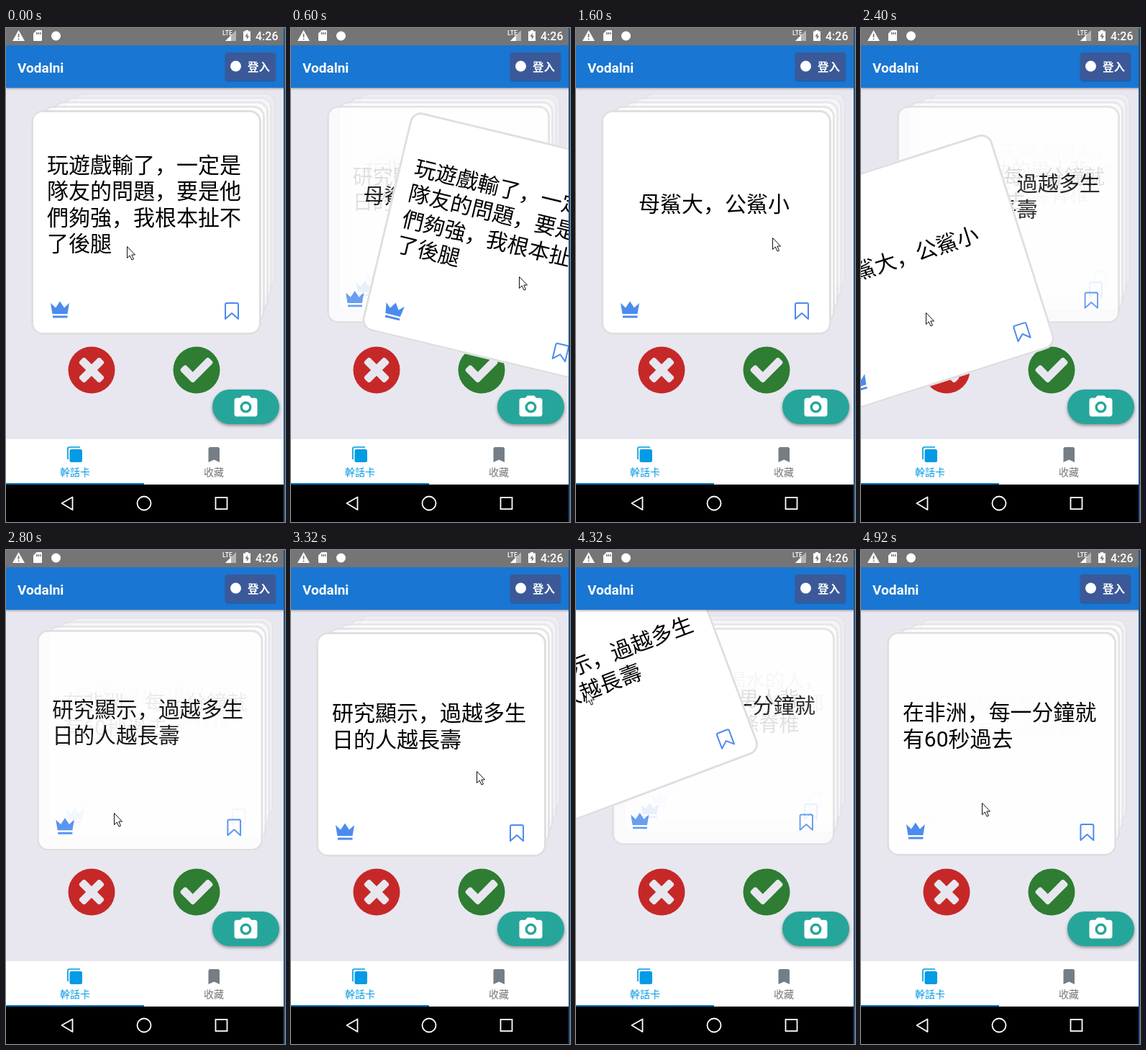
Recreate the animation shown at these times as an HTML page. Size 388 by 686 pixels, loop 4.96 s.

```html
<!DOCTYPE html>
<html lang="zh-Hans">
<head>
<meta charset="utf-8">
<title>Cards</title>
<style>
html, body { margin: 0; width: 100%; height: 100%; overflow: hidden; }
body { background: #e8e7f0; font-family: Roboto, "Noto Sans CJK SC", "Noto Sans CJK", sans-serif; }
#stage { position: relative; width: 388px; height: 686px; overflow: hidden; background: #e8e7f0; }
svg { position: absolute; left: 0; top: 0; overflow: visible; }
#deck { position: absolute; z-index: 0; left: 0; top: 83px; width: 388px; height: 488px; overflow: hidden; }
#bar, #fab, #front { z-index: 1; }
.card {
  position: absolute; left: 35px; top: 31px; width: 320px; height: 312px;
  background: #fff; border-radius: 16px; box-shadow: inset 0 0 0 3px #dfdfe1;
}
.words {
  position: absolute; left: 22px; top: 0; width: 270px; height: 263px;
  display: flex; align-items: center; justify-content: center;
  font-size: 30px; line-height: 36.2px; color: #000; white-space: pre;
}
.words.long { justify-content: flex-start; }
#bar { position: absolute; left: 0; top: 24px; width: 388px; height: 59px; background: #1976d2; box-shadow: 0 1px 3px rgba(0,0,0,.4); }
#login { position: absolute; left: 305px; top: 10px; width: 70px; height: 39px; border-radius: 4px; background: #3b5998; box-shadow: 0 1px 2px rgba(0,0,0,.25); }
#fab { position: absolute; left: 287px; top: 502px; width: 93px; height: 48px; border-radius: 24px; background: #26a69a; box-shadow: 0 2px 4px rgba(0,0,0,.4); }
</style>
</head>
<body>
<div id="stage">
  <svg width="388" height="686">
    <circle cx="119" cy="475" r="32.5" fill="#c62828"/>
    <circle cx="265" cy="475" r="32.5" fill="#2e7d32"/>
    <g fill="#e8e7f0">
      <path transform="translate(119 475) scale(.029) translate(-704 -960)" d="M1298 1322q0-40-28-68l-294-294 294-294q28-28 28-68t-28-68l-136-136q-28-28-68-28t-68 28l-294 294-294-294q-28-28-68-28t-68 28l-136 136q-28 28-28 68t28 68l294 294-294 294q-28 28-28 68t28 68l136 136q28 28 68 28t68-28l294-294 294 294q28 28 68 28t68-28l136-136q28-28 28-68z"/>
      <path transform="translate(265 475) scale(.029) translate(-896 -928)" d="M1671 566q0 40-28 68l-724 724-136 136q-28 28-68 28t-68-28l-136-136-362-362q-28-28-28-68t28-68l136-136q28-28 68-28t68 28l294 295 656-657q28-28 68-28t68 28l136 136q28 28 28 68z"/>
    </g>
  </svg>

  <div id="deck"></div>

  <div id="bar"><div id="login"></div></div>
  <div id="fab"></div>

  <svg id="front" width="388" height="686">
    <rect width="388" height="24" fill="#757575"/>
    <g fill="#fff">
      <path d="M17.5 3L26 18H9zM16.7 8v5h1.7V8zM16.7 14.5v1.8h1.7v-1.8z" fill-rule="evenodd"/>
      <path d="M42.5 3H49q1 0 1 1V17q0 1-1 1H39q-1 0-1-1V7.5zM42 6v3h1.5V6zM44.5 6v3H46V6zM47 6v3h1.5V6z" fill-rule="evenodd"/>
      <circle cx="69.5" cy="11" r="6.5"/>
      <text x="301" y="10" font-size="8.5" font-weight="500">LTE</text>
      <path d="M320 3V18H305z" opacity=".45"/>
      <path d="M313 10V18H305z"/>
      <path d="M333 3h4v1.5h3V18h-10V4.5h3zM335.8 7l-3.3 5h2.3v4l3.3-5h-2.3z" fill-rule="evenodd"/>
      <text x="347" y="17" font-size="16" font-weight="500">4:26</text>
      <text x="16" y="61.5" font-size="19" font-weight="700">Vodalni</text>
      <circle cx="319.5" cy="53" r="7.5"/>
      <text x="336" y="59.5" font-size="15.5" font-weight="700">登入</text>
      <path transform="translate(314.3 507.4) scale(1.6)" d="M9 2L7.17 4H4c-1.1 0-2 .9-2 2v12c0 1.1.9 2 2 2h16c1.1 0 2-.9 2-2V6c0-1.1-.9-2-2-2h-3.17L15 2zM12 17a5 5 0 1 1 0-10a5 5 0 1 1 0 10z" fill-rule="evenodd"/>
      <circle cx="333.5" cy="526.6" r="4.6"/>
    </g>

    <rect y="571" width="388" height="63" fill="#fff"/>
    <rect y="632" width="192" height="2" fill="#0277bd"/>
    <rect x="88.5" y="585" width="17.5" height="18" rx="2.5" fill="#039be5"/>
    <path d="M86 599V584q0-2 2-2H103" fill="none" stroke="#039be5" stroke-width="1.7"/>
    <path d="M281.5 603V584.5q0-2.5 2.5-2.5H294.5q2.5 0 2.5 2.5V603l-7.75-3.5z" fill="#757d86"/>
    <text x="75" y="622" font-size="14" fill="#039be5">幹話卡</text>
    <text x="275" y="622" font-size="14" fill="#757575">收藏</text>

    <rect y="634" width="388" height="52" fill="#000"/>
    <g fill="none" stroke="#fff" stroke-width="1.8">
      <path d="M77.5 660L92.5 651.5V669z" stroke-linejoin="round"/>
      <circle cx="192" cy="660" r="9.5"/>
      <rect x="291.5" y="652" width="16" height="16"/>
    </g>
    <rect x="386" width="2" height="686" fill="#24527f"/>
    <path id="cursor" d="M.5 .5V16.5L4.2 13L7 19L9.5 18L6.8 12H11.5z" fill="#fff" stroke="#111"/>
  </svg>
</div>

<script>
const LOOP = 4960;
const texts = [
  '玩遊戲輸了，一定是\n隊友的問題，要是他\n們夠強，我根本扯不\n了後腿',
  '母鯊大，公鯊小',
  '研究顯示，過越多生\n日的人越長壽',
  '在非洲，每一分鐘就\n有60秒過去',
  '每個成功的男人背\n後，都有一條脊椎',
  '凡是每天喝水的人，\n在一百年之後，全都\n會死掉',
  '', ''
];

// pointer path: time, x, y
const path = [
  [0, 168, 303], [200, 224, 312], [400, 262, 324], [600, 317, 345], [700, 345, 352],
  [1000, 335, 335], [1300, 300, 305], [1600, 273, 291], [1700, 212, 324], [1800, 196, 332],
  [2100, 145, 365], [2400, 90, 395], [2500, 66, 403], [2800, 150, 365], [3100, 235, 318],
  [3300, 258, 307], [3600, 156, 277], [3900, 105, 247], [4300, 14, 196], [4400, -6, 186],
  [4600, 50, 250], [4900, 168, 351]
];
const swipes = [
  { grab: 200, drop: 700, side: 1 },
  { grab: 1700, drop: 2500, side: -1 },
  { grab: 3600, drop: 4400, side: -1 }
];

const deck = document.getElementById('deck');
const cursor = document.getElementById('cursor');
const icons = `<svg width="320" height="312"><g transform="translate(-35 -114)">
  <path d="M62 382L69 388.5L75 379.5L81 388.5L88 382L85.5 397H64.5zM65 399.5H85.5V402.5H65z" fill="#4b8bef"/>
  <path d="M305 404V384q0-2 2-2H321q2 0 2 2V404L314 396z" fill="none" stroke="#4b8bef" stroke-width="2" stroke-linejoin="round"/>
</g></svg>`;

const cards = texts.map((text, i) => {
  const card = document.createElement('div');
  card.className = 'card';
  card.style.zIndex = texts.length - i;
  card.innerHTML = icons + `<div class="words${text.includes('\n') ? ' long' : ''}">${text}</div>`;
  deck.append(card);
  return card;
});

const clamp = (v, lo, hi) => Math.min(hi, Math.max(lo, v));
const easeOut = u => 1 - (1 - u) ** 3;

function pointer(t) {
  const i = path.findIndex(p => p[0] > t);
  if (i < 0) return path[path.length - 1].slice(1);
  const [a, b] = [path[i - 1], path[i]];
  const u = (t - a[0]) / (b[0] - a[0]);
  return [a[1] + (b[1] - a[1]) * u, a[2] + (b[2] - a[2]) * u];
}

function swipeOffset({ grab, drop, side }, t) {
  if (t < grab) return [0, 0];
  const [x0, y0] = pointer(grab);
  const [x, y] = pointer(Math.min(t, drop));
  const u = clamp((t - drop) / 300, 0, 1);
  return [x - x0 + side * 520 * u, (y - y0) * (1 + 1.5 * u)];
}

function draw(t) {
  const shift = swipes.reduce((sum, s) => sum + easeOut(clamp((t - s.drop - 200) / 500, 0, 1)), 0);
  cards.forEach((card, i) => {
    const slot = Math.max(0, i - shift);
    const swipe = swipes[i];
    const [dx, dy] = swipe ? swipeOffset(swipe, t) : [0, 0];
    const gone = swipe && t >= swipe.drop + 300;
    card.style.visibility = gone || slot > 4.01 ? 'hidden' : 'visible';
    card.style.opacity = 1 - 0.18 * slot;
    card.style.transform = `translate(${dx + 10 * slot}px, ${dy - 11 * slot}px) ` +
      `rotate(${0.145 * clamp(dx, -180, 180)}deg) scale(${1 - slot / 32})`;
  });
  const [x, y] = pointer(t);
  cursor.setAttribute('transform', `translate(${x} ${y})`);
}

// ten pictures a second, each starting on a 40 ms tick
function frame(now) {
  const tick = Math.floor((now % LOOP) / 40) * 40;
  draw(Math.floor(tick / 100) * 100);
  requestAnimationFrame(frame);
}
draw(0);
requestAnimationFrame(frame);
</script>
</body>
</html>
```
